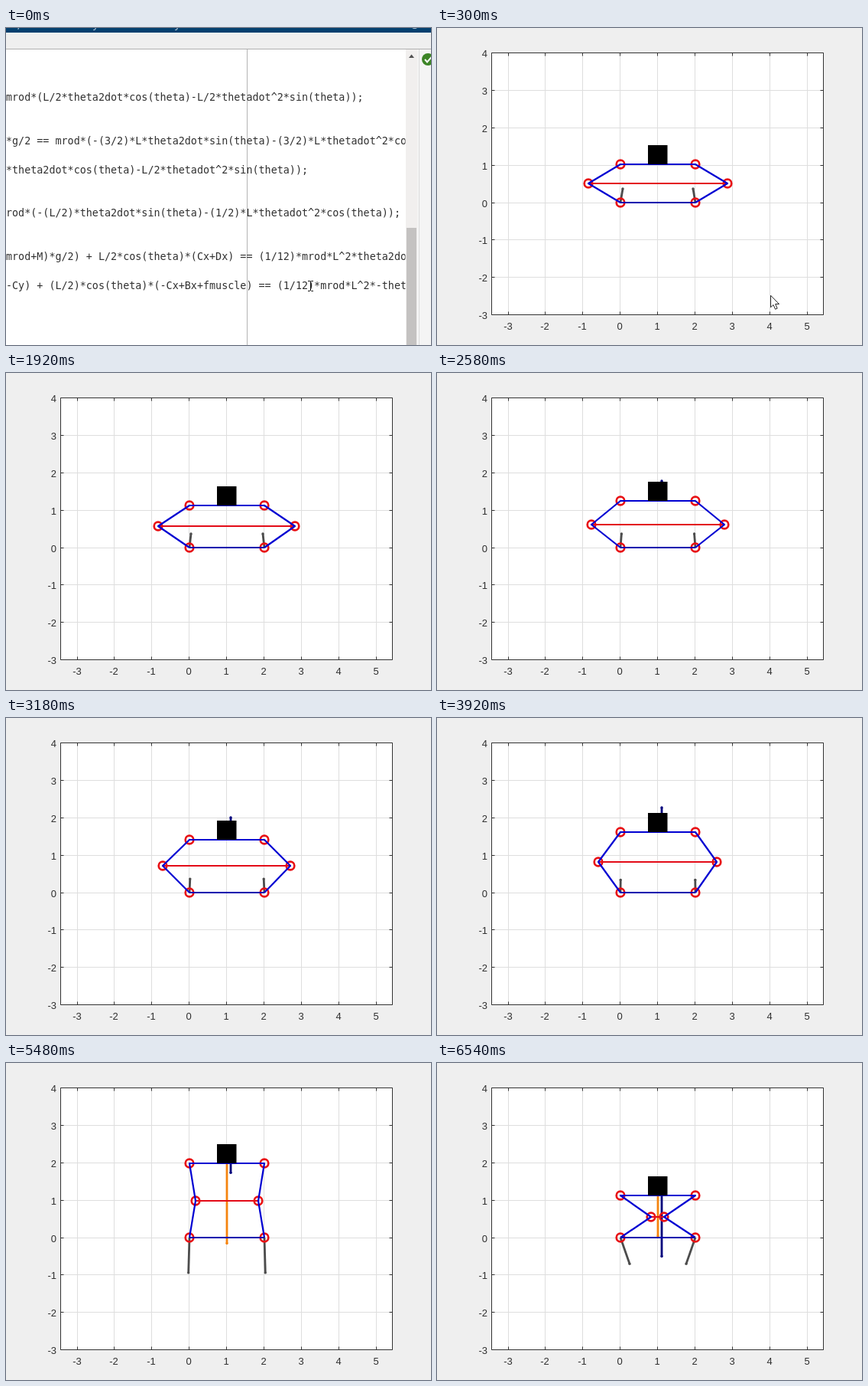
An HTML page for the animation above (6.58 s loop, 556x414 px).

```html
<!DOCTYPE html>
<html lang="en">
<head>
<meta charset="utf-8">
<title>Linkage simulation</title>
<style>
  html, body { margin: 0; width: 100%; height: 100%; overflow: hidden; background: #efefef; }
  svg { display: block; width: 556px; height: 414px; }
  .code { font: 13.4px "DejaVu Sans Mono", "Noto Sans Mono", monospace; fill: #303030; white-space: pre; }
  .label { font: 13px "Liberation Sans", Arial, sans-serif; fill: #303030; }
  .bar { font: 13px "Open Sans", sans-serif; fill: #c8d6e4; }
  .grid { stroke: #dedede; }
  .axis { stroke: #333; fill: none; }
  .link { fill: none; stroke: #0000d2; stroke-width: 2.2; stroke-linejoin: round; }
  .joint { fill: none; stroke: #e81014; stroke-width: 2.7; }
  .force { stroke-width: 2.8; }
</style>
</head>
<body>
<svg viewBox="0 0 556 414">
  <defs><clipPath id="page"><rect y="28" width="522.5" height="386"/></clipPath></defs>
  <g id="editor">
    <rect width="556" height="414" fill="#fff"/>
    <rect width="556" height="28" fill="#efefef"/>
    <rect width="556" height="6" fill="#04406f"/>
    <text class="bar" y="0"><tspan x="15">,</tspan><tspan x="114">y</tspan><tspan x="221">y</tspan><tspan x="529">@</tspan></text>
    <path d="M0 27.5H556" stroke="#b0b0b0"/>
    <path d="M315.5 28V414" stroke="#b4b4b4"/>
    <g id="lines" class="code" clip-path="url(#page)"></g>
    <rect x="523" y="28" width="15" height="386" fill="#f1efee"/>
    <rect x="524" y="261" width="13" height="153" fill="#c4c2c1"/>
    <path d="M527 39l3.5-4.5 3.5 4.5z" fill="#505050"/>
    <rect x="538" y="28" width="18" height="386" fill="#f4f4f4"/>
    <path d="M540.5 28V414" stroke="#dcdcdc"/>
    <circle cx="552" cy="41" r="8" fill="#3c8426"/>
    <path d="M548 41l3 3.5 6-7" fill="none" stroke="#fff" stroke-width="2"/>
    <path d="M395 330.5h2.5l1 1 1-1h2.5M398.5 331v12M395 343.5h2.5l1-1 1 1h2.5" fill="none" stroke="#111"/>
  </g>
  <g id="figure">
    <rect width="556" height="414" fill="#efefef"/>
    <rect x="71.5" y="32.5" width="434" height="342" fill="#fff"/>
    <g id="axes"></g>
    <g id="forces"></g>
    <path class="link" id="muscle" style="stroke:#e30b17"/>
    <g id="joints"></g>
    <path class="link" id="frame"/>
    <path class="link" d="M240 228H338" style="stroke:#0000ae"/>
    <rect id="mass" x="276" width="25.5" height="25"/>
    <path id="pointer" d="M0 0V15.5L3.5 12.3 6 18 8.6 16.9 6.1 11.3H11Z" fill="#fff" stroke="#222" stroke-linejoin="round"/>
  </g>
</svg>
<script>
const LOOP = 6580, UNIT = 48.93;
const px = x => 239.8 + UNIT * x, py = y => 228 - UNIT * y;
const $ = id => document.getElementById(id);

function set(el, attrs) {
  for (const k in attrs) el.setAttribute(k, attrs[k]);
}
function add(parent, tag, attrs, text) {
  const el = document.createElementNS("http://www.w3.org/2000/svg", tag);
  set(el, attrs);
  if (text !== undefined) el.textContent = text;
  return parent.appendChild(el);
}

// Code listing
[
  [95, "mrod*(L/2*theta2dot*cos(theta)-L/2*thetadot^2*sin(theta));"],
  [152, "*g/2 == mrod*(-(3/2)*L*theta2dot*sin(theta)-(3/2)*L*thetadot^2*cos(theta));"],
  [190, "*theta2dot*cos(theta)-L/2*thetadot^2*sin(theta));"],
  [246, "rod*(-(L/2)*theta2dot*sin(theta)-(1/2)*L*thetadot^2*cos(theta));"],
  [303, "mrod+M)*g/2) + L/2*cos(theta)*(Cx+Dx) == (1/12)*mrod*L^2*theta2dot;"],
  [341, "-Cy) + (L/2)*cos(theta)*(-Cx+Bx+fmuscle) == (1/12)*mrod*L^2*-theta2dot;"]
].forEach(([y, s]) => add($("lines"), "text", { x: 0, y }, s));

// Axes
const axes = $("axes"), ticks = [];
const crisp = v => Math.floor(v) + 0.5;
for (let k = -3; k <= 5; k++) {
  const x = crisp(px(k));
  add(axes, "path", { class: "grid", d: `M${x} 33V374` });
  ticks.push(`M${x} 374.5v-4M${x} 32.5v4`);
  add(axes, "text", { class: "label", x: x - 0.5, y: 394, "text-anchor": "middle" }, k);
}
for (let k = -3; k <= 4; k++) {
  const y = crisp(py(k));
  add(axes, "path", { class: "grid", d: `M72 ${y}H505` });
  ticks.push(`M71.5 ${y}h4M505.5 ${y}h-4`);
  add(axes, "text", { class: "label", x: 66, y: y + 5.5, "text-anchor": "end" }, k);
}
add(axes, "path", { class: "axis", d: "M71.5 32.5H505.5V374.5H71.5Z" + ticks.join("") });

// Moving parts
const joints = Array.from({ length: 6 }, () => add($("joints"), "circle", { class: "joint", r: 5.3 }));
const arrow = color => ({
  line: add($("forces"), "path", { class: "force", stroke: color }),
  tip: add($("forces"), "circle", { fill: color, r: 1.7 })
});
const legs = [arrow("#4c4c4c"), arrow("#4c4c4c")], lift = arrow("#f5840f"), push = arrow("#00007c");

function drawArrow(a, x, y, dx, dy) {
  const display = Math.hypot(dx, dy) > 2 ? "inline" : "none";
  set(a.line, { d: `M${x} ${y}l${dx} ${dy}`, display });
  set(a.tip, { cx: x + dx, cy: y + dy, display });
}

// Angle in degrees and force lengths in pixels, by simulation step
const bump = (n, mid, width) => Math.exp(-(((n - mid) / width) ** 2));
const angle = n => 30.9 + 0.45 * n + 0.0291 * n ** 2 + 0.00416 * n ** 3;
const legX = n => 3 - 0.2 * n + 14.4 * Math.exp(n - 27);
const legY = n => 75 * bump(n, 24, 5) - 18;
const liftY = n => 115 * bump(n, 23.3, 4.2);
const pushY = n => 7 * Math.max(0, n - 17) ** 1.25 - 18 - n;

function pose(n) {
  const a = angle(n) * Math.PI / 180, c = Math.cos(a), s = Math.sin(a);
  const pts = [[0, 0], [-c, s], [0, 2 * s], [2, 2 * s], [2 + c, s], [2, 0]]
    .map(([x, y]) => [Math.round(px(x)), Math.round(py(y))]);
  const top = pts[2][1];
  pts.forEach(([cx, cy], i) => set(joints[i], { cx, cy }));
  set($("frame"), { d: "M" + pts.join("L") });
  set($("muscle"), { d: `M${pts[1]}L${pts[4]}` });
  set($("mass"), { y: top - 25 });
  drawArrow(legs[0], 240, 228, legX(n), legY(n));
  drawArrow(legs[1], 338, 228, -legX(n), legY(n));
  drawArrow(lift, 289, top, 0, liftY(n));
  drawArrow(push, 294, top, 0, pushY(n));
}

const start = performance.now();
function tick() {
  const t = Math.max(0, performance.now() - start) % LOOP;
  pose(Math.max(0, Math.floor((t - 760) / 211)));
  $("figure").style.opacity = Math.min(1, Math.max(0, (t - 20) / 160));
  const glide = (t - 20) / 940;
  set($("pointer"), { transform: `translate(${398 + 129 * glide} ${337 + 41 * glide})` });
  requestAnimationFrame(tick);
}
tick();
</script>
</body>
</html>
```
